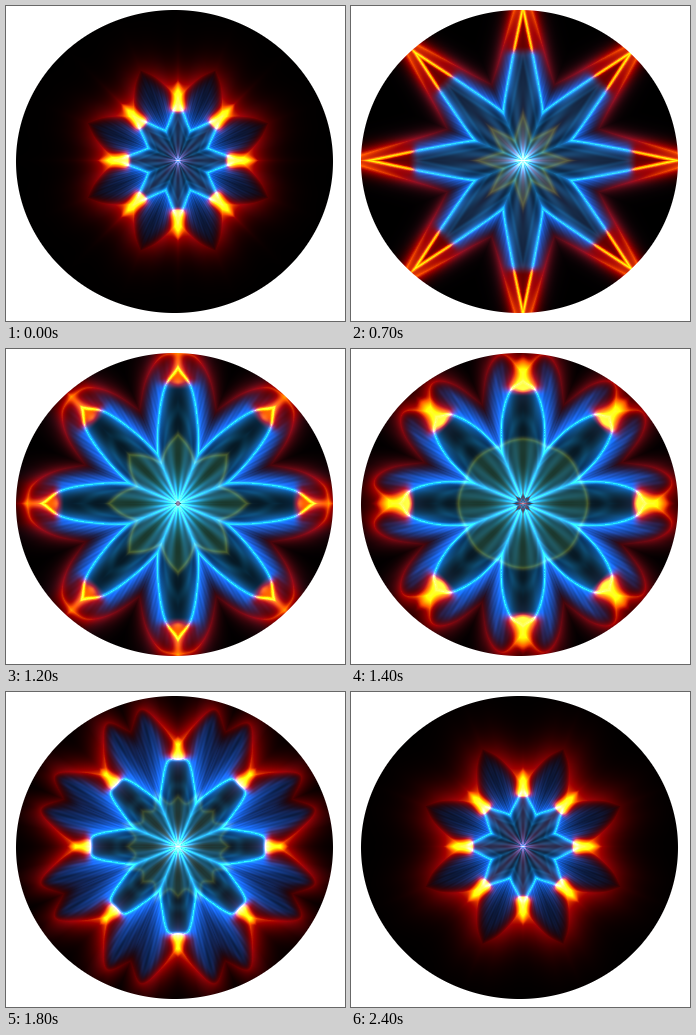
An HTML page with a canvas for the animation above (2.5 s loop, 339 px wide and 315 px high).

```html
<!DOCTYPE html>
<html lang="en">
<head>
<meta charset="utf-8">
<title>Kaleidoscope star</title>
<style>
html, body { margin: 0; width: 100%; height: 100%; overflow: hidden; background: #fff; }
canvas { display: block; }
</style>
</head>
<body>
<canvas id="c" width="339" height="315"></canvas>
<script>
const W = 339, H = 315, LOOP = 2500, STEP = 100;
const CX = 172, CY = 154.5, WEDGE = Math.PI / 8, N = 256;
const ctx = document.getElementById('c').getContext('2d');

// Poses. Curves give radii from the point axis (first) to the valley (last).
// line: bright outline, edge: red rim, olive: inner figure
// v: fire start, fire end, fire width, flame, blue, rim glow, olive, core, rays
const poses = [
  { t: 0,    line: [60, 46, 37, 32],   edge: [62, 73, 86, 98],     olive: [8, 8, 8],    v: [51, 80, 7, 1, .65, 11, 0, 0, .05] },
  { t: 300,  line: [95, 62, 47, 38],   edge: [150, 90, 76, 71],    olive: [12, 9, 7],   v: [68, 150, 7, .7, .5, 7, 0, 0, .1] },
  { t: 700,  line: [153, 94, 67, 52],  edge: [178, 126, 98, 82],   olive: [46, 30, 22], v: [108, 160, 6, .1, .65, 7, .7, 14, .15] },
  { t: 1000, line: [149, 114, 72, 51], edge: [172, 142, 115, 94],  olive: [74, 50, 28], v: [126, 160, 8, .1, .75, 7, .8, 30, .45] },
  { t: 1400, line: [122, 110, 82, 55], edge: [130, 150, 137, 107], olive: [65, 64, 62], v: [114, 150, 12, 1, .9, 8, .7, 26, .6] },
  { t: 1800, line: [87, 84, 62, 47],   edge: [100, 122, 142, 124], olive: [50, 44, 58], v: [89, 110, 7, 1, 1, 10, .5, 16, .7] },
  { t: 2400, line: [58, 46, 39, 34],   edge: [60, 75, 92, 106],    olive: [45, 45, 60], v: [52, 78, 7, 1, .7, 13, 0, 0, .05] }
];
poses.push({ ...poses[0], t: LOOP });

const { exp, abs, sin, cos, sqrt, min, max } = Math;
const clamp = x => max(0, min(1, x));
const smooth = (a, b, x) => { const k = clamp((x - a) / (b - a)); return k * k * (3 - 2 * k); };
const bell = x => exp(-x * x);

// Fold every pixel into one mirrored wedge.
const pixels = [];
for (let y = 0; y < H; y++) for (let x = 0; x < W; x++) {
  const rim = sqrt(((x + .5 - 168.5) / 158.5) ** 2 + ((y + .5 - 155.5) / 151.5) ** 2);
  const cover = clamp((1 - rim) * 155 + .5);
  if (!cover) continue;
  const dx = x + .5 - CX, dy = y + .5 - CY;
  const turn = Math.atan2(dy, dx) / (2 * WEDGE);
  const u = 2 * abs(turn - Math.round(turn));
  pixels.push({ i: (y * W + x) * 4, r: Math.hypot(dx, dy) + .01, u, cover });
}

function poseAt(t) {
  let n = 0;
  while (n < poses.length - 2 && t >= poses[n + 1].t) n++;
  const a = poses[n], b = poses[n + 1], k = (t - a.t) / (b.t - a.t);
  const mix = key => a[key].map((x, i) => x + (b[key][i] - x) * k);
  return { line: mix('line'), edge: mix('edge'), olive: mix('olive'), v: mix('v') };
}

// Spline through reciprocal radii: straight star edges stay straight.
function curve(radii) {
  const q = radii.map(r => 1 / r), last = q.length - 1;
  const at = i => i < 0 ? 2 * q[0] - q[1] : i > last ? 2 * q[last] - q[last - 1] : q[i];
  const R = [], S = [];
  for (let j = 0; j <= N; j++) {
    const x = j / N * last, i = min(last - 1, Math.floor(x)), f = x - i;
    const a = at(i - 1), b = at(i), c = at(i + 1), d = at(i + 2);
    R[j] = 1 / (b + .5 * f * (c - a + f * (2 * a - 5 * b + 4 * c - d + f * (3 * (b - c) + d - a))));
  }
  for (let j = 0; j <= N; j++) {
    const lo = max(0, j - 1), hi = min(N, j + 1);
    S[j] = (R[hi] - R[lo]) / ((hi - lo) / N * WEDGE);
  }
  return { R, dist: (r, j) => (r - R[j]) / sqrt(1 + (S[j] / r) ** 2) };
}

function render(t) {
  const pose = poseAt(t);
  const line = curve(pose.line), edge = curve(pose.edge), olive = curve(pose.olive);
  const [fs, fe, fw, flame, blue, glow, tint, core, ray] = pose.v;
  const valley = pose.line[3];
  const hub = 12 * max(0, 1 - abs(t - 1400) / 300);
  const img = ctx.createImageData(W, H), out = img.data;

  for (const { i, r, u, cover } of pixels) {
    const j = Math.round(u * N), a = u * WEDGE;
    const x = r * cos(a), y = r * sin(a), gap = r * sin(WEDGE - a);
    const d = line.dist(r, j), e = edge.dist(r, j);
    const hot = smooth(fs - 4, fs + 7, r), cool = 1 - hot * (1 - smooth(.25, .6, u));
    let red = 0, green = 0, blu = 0;
    const add = (k, cr, cg, cb) => { red += k * cr; green += k * cg; blu += k * cb; };

    // feathers between outline and rim
    if (d > 0 && e < 0) {
      const vein = .8 + .1 * sin(38 * u + r * .09) + .08 * sin(71 * u - r * .05);
      const fade = smooth(0, 14, -e) * (.25 + .75 * exp(-d / 34));
      add(blue * vein * fade * (.3 + .7 * cool), 30, 76, 180);
    }

    // interior
    if (d < 1) {
      const q = r / line.R[j], inside = smooth(1, -2, d) * cool;
      const shade = .65 + .25 * cos(u * 9.4 + 3.1) + .1 * sin(q * 16);
      add(inside * shade, 14, 56, 82);
      add(inside * .25 * bell((q - .7) / .06), 10, 90, 130);
    }

    // olive figure
    if (tint > .01) {
      const o = olive.dist(r, j);
      add(tint * smooth(1, -1, o), 26, 36, 4);
      add(tint * bell(o / 2.2), 62, 52, 0);
    }

    // outline
    const lit = bell(d / 1.5), aura = exp(-abs(d) / (d > 0 ? 6 + 6 * blue : 3 + 2 * blue));
    add(cool * lit, 18, 110, 110);
    add(cool * aura, 6, 82, 180);

    // rays and core
    const reach = smooth(valley + 10, valley - 14, r);
    add(ray * reach * exp(-gap / 2.2), 30, 150, 190);
    add(ray * .6 * exp(-y / 1.5 - r / 26), 30, 150, 190);
    if (core > .5) add(bell(r / core) * (.6 - .2 * cos(u * 9.4)), 10, 150, 220);
    if (hub > .5) {
      const dark = 1 - .7 * smooth(hub, hub * .6, r * (1 + .5 * u));
      red *= dark; green *= dark; blu *= dark;
    }

    // heat: rim, burning outline, flames on the axis
    const p = (x - fs) / (fe - fs), wide = fw * sqrt(max(.02, 1 - p));
    let heat = (.75 - .5 * u) * exp(-abs(e) / (e > 0 ? glow : 5));
    heat += (1 - cool) * (.7 * lit + .55 * exp(-abs(d) / (d > 0 ? 9 : 4)));
    if (p > -.3) {
      const lift = flame * smooth(-.2, .08, p);
      heat += lift * smooth(1.1, .6, p) * (.6 + .7 * bell(p / .3)) * bell(y / wide);
      heat += lift * .3 * exp(-y / (.8 * fw) - max(0, p - .4) * 1.4);
    }
    add(1, 255 * min(1, heat * 1.15), 260 * clamp(heat - .55), 90 * clamp(heat - 1.45));

    const paper = 255 * (1 - cover);
    out[i] = min(255, red) * cover + paper;
    out[i + 1] = min(255, green) * cover + paper;
    out[i + 2] = min(255, blu) * cover + paper;
    out[i + 3] = 255;
  }
  return img;
}

const cache = [];
let shown = -1;
const start = performance.now();

function draw() {
  const n = Math.floor((performance.now() - start) % LOOP / STEP);
  if (n !== shown) {
    cache[n] = cache[n] || render(n * STEP);
    ctx.putImageData(cache[n], 0, 0);
    shown = n;
  }
  requestAnimationFrame(draw);
}
draw();
</script>
</body>
</html>
```
